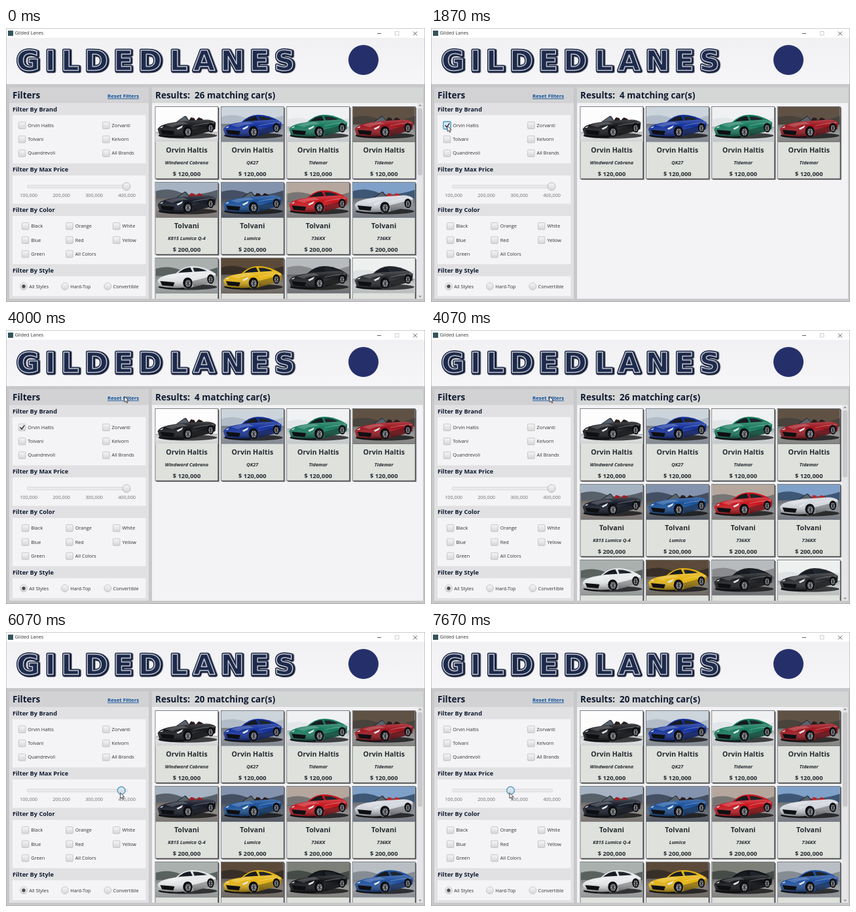
Recreate the animation shown at these times as an HTML page. Size 640 px wide and 420 px high, loop 8 s.

```html
<!DOCTYPE html>
<html lang="en">
<head>
<meta charset="utf-8">
<title>Gilded Lanes</title>
<style>
  html, body { margin: 0; width: 100%; height: 100%; overflow: hidden; background: #c8c8ca; }
  svg { display: block; }
  #stage { width: 100vw; height: 100vh; }
  text { font: 7.3px "Open Sans", "Noto Sans", sans-serif; fill: #333; white-space: pre; }
  .h1 { font-size: 13.5px; font-weight: 700; fill: #0f1a30; }
  .h2 { font-size: 9.2px; font-weight: 700; fill: #0f1a30; }
  .link { font-size: 7.8px; font-weight: 700; fill: #0b4f9c; text-decoration: underline; }
  .tick { fill: #707070; text-anchor: middle; }
  .brand, .model, .price { text-anchor: middle; font-weight: 700; fill: #262b30; }
  .brand { font-size: 10.7px; }
  .model { font-size: 7.4px; font-style: italic; }
  .price { font-size: 9.4px; }
  .logo { font: 700 43px "DejaVu Sans", sans-serif; letter-spacing: 8.5px; stroke-linejoin: round; }
</style>
</head>
<body>
<svg id="stage" viewBox="0 0 640 420">
  <defs>
    <linearGradient id="knob" x2="0" y2="1">
      <stop stop-color="#f6f6f6"/><stop offset="1" stop-color="#d6d6d6"/>
    </linearGradient>
    <linearGradient id="head" x2="0" y2="1">
      <stop stop-color="#f1f0f3"/><stop offset="1" stop-color="#f6f5f8"/>
    </linearGradient>
    <linearGradient id="gloss" x2="0" y2="1">
      <stop stop-color="#fff" stop-opacity=".2"/><stop offset=".35" stop-color="#fff" stop-opacity="0"/>
      <stop offset="1" stop-color="#000" stop-opacity=".5"/>
    </linearGradient>
    <linearGradient id="floor" x2="0" y2="1">
      <stop stop-color="#000" stop-opacity=".18"/><stop offset=".5" stop-color="#fff" stop-opacity=".1"/>
      <stop offset="1" stop-color="#000" stop-opacity=".08"/>
    </linearGradient>
  </defs>
</svg>
<script>
const LOOP = 8000;
const stage = document.getElementById('stage');

const rect = (x, y, w, h, fill, extra = '') =>
  `<rect x="${x}" y="${y}" width="${w}" height="${h}" fill="${fill}" ${extra}/>`;
const label = (x, y, text, cls = '', extra = '') =>
  `<text x="${x}" y="${y}" class="${cls}" ${extra}>${text}</text>`;
const path = (d, fill, extra = '') => `<path d="${d}" fill="${fill}" ${extra}/>`;
const circle = (x, y, r, fill, extra = '') => `<circle cx="${x}" cy="${y}" r="${r}" fill="${fill}" ${extra}/>`;
const ellipse = (x, y, rx, ry, fill, extra = '') =>
  `<ellipse cx="${x}" cy="${y}" rx="${rx}" ry="${ry}" fill="${fill}" ${extra}/>`;
const group = (id, content) => `<g id="${id}">${content}</g>`;

function titleBar() {
  return rect(0, 0, 640, 15, '#fff') + rect(3, 4, 8, 8, '#35545c') + label(13.5, 10.4, 'Gilded Lanes') +
    path('M567 8.5h6M622 5.5l6 6m0-6l-6 6', 'none', 'stroke="#333" stroke-width=".8"') +
    rect(594.5, 5.5, 5.5, 5.5, 'none', 'stroke="#c4c4c4" stroke-width=".8"');
}

function banner() {
  const words = (shift, fill, stroke, width) => {
    const style = `style="fill:${fill};stroke:${stroke};stroke-width:${width}"`;
    return label(16 + shift, 65 + shift, 'GILDED', 'logo', style) +
      label(250 + shift, 65 + shift, 'LANES', 'logo', style);
  };
  return rect(0, 15, 640, 71, 'url(#head)') +
    words(1.4, '#141d36', '#9b9da6', 6.6) + words(1.2, '#141d36', '#141d36', 5) +
    words(0, '#1d2a4c', '#1d2a4c', 4.4) + words(0, '#1d2a4c', '#c4c6cc', 1.5) +
    circle(546, 49, 23, '#25306b');
}

const checkBox = (x, y, text) =>
  rect(x, y - 5, 10.5, 10.5, 'url(#knob)', 'rx="1" stroke="#bcbcbc" stroke-width=".8"') +
  label(x + 14, y + 2.6, text);

const radio = (x, text, selected) =>
  circle(x, 396, 5.4, 'url(#knob)', 'stroke="#bcbcbc" stroke-width=".8"') +
  (selected ? circle(x, 396, 2.7, '#4c4c4c') : '') + label(x + 8.3, 398.6, text);

const checkGrid = (xs, y, rows) => rows.map((row, r) =>
  row.map((text, c) => checkBox(xs[c], y + r * 21.4, text)).join('')).join('');

function filterPanel() {
  const box = (title, y, h) => label(10, y - 6, title, 'h2') + rect(10, y, 203.5, h, '#f4f3f6');
  return rect(5, 91, 213, 324, '#e1e1e3') + rect(5, 91, 213, 24, '#d2d2d4') +
    label(10, 107.8, 'Filters', 'h1') + label(155, 107, 'Reset Filters', 'link') +
    box('Filter By Brand', 133.5, 74) + box('Filter By Max Price', 226, 43.5) +
    box('Filter By Color', 288, 74) + box('Filter By Style', 380.5, 30.5) +
    checkGrid([19.3, 147.6], 149, [['Orvin Haltis', 'Zorvanti'], ['Tolvani', 'Kelvorn'], ['Quandrevoli', 'All Brands']]) +
    checkGrid([24.3, 91.7, 163.5], 303.5, [['Black', 'Orange', 'White'], ['Blue', 'Red', 'Yellow'], ['Green', 'All Colors']]) +
    radio(27, 'All Styles', true) + radio(90, 'Hard-Top') + radio(155.3, 'Convertible') +
    rect(32.5, 241, 153, 4, '#ececec', 'rx="1.5" stroke="#cfcfcf" stroke-width=".8"') +
    ['100,000', '200,000', '300,000', '400,000'].map((p, i) => label(34.6 + 50 * i, 258.7, p, 'tick')).join('') +
    group('ring', rect(18.8, 143.5, 11.5, 11.5, '#cfe9f8', 'rx="1.5" fill-opacity=".6" stroke="#3d9ccc" stroke-width="1.3"')) +
    group('check', path('M21.5 149l2.6 3 4.2-6', 'none', 'stroke="#333" stroke-width="1.4"')) +
    group('thumb', circle(0, 243, 6, 'url(#knob)', 'stroke="#b4b4b4" stroke-width=".9"') +
      group('thumbRing', circle(0, 243, 5.8, '#bcd9ec', 'fill-opacity=".4" stroke="#4a9ccb" stroke-width="1.3"')));
}

// Three-quarter view of a low sports car in front of a simple backdrop.
function photo(x, y, { sky, far, ground, paint, open, horizon, seat = '#2a1c1c' }) {
  const wheel = (cx, cy, rx, ry) => ellipse(cx, cy, rx, ry, '#101114') +
    ellipse(cx - .4, cy, rx * .68, ry * .72, '#8b8e94') +
    path(`M${cx - .4} ${cy - ry * .7}v${ry * 1.4}M${cx - rx * .6} ${cy - ry * .4}l${rx} ${ry * .8}m0 ${-ry * .8}l${-rx} ${ry * .8}`,
      'none', 'stroke="#1b1c20" stroke-width=".9"');
  const body = 'M3 34Q6 28 20 25L38 22L70 20Q86 18 92 24L91 34L84 37L58 44Q46 47 20 46L6 43Z';
  const cabin = open
    ? path('M32 23L45 14L47 14L52 22Z', '#59636d') + path('M32 23L45 14L52 22', 'none', 'stroke="#15171b" stroke-width=".9"') +
      path('M50 22L54 16L59 17L61 21L66 16L71 18L74 21Z', seat)
    : path('M30 24Q42 12 56 12Q72 12 88 21L60 26Z', paint) + path('M33 24Q43 14 53 14L58 24Z', '#171b21') +
      path('M60 23L57 14.500Q70 14 79 20Z'.replace('14.500', '14.5'), '#1f252c');
  return `<svg x="${x}" y="${y}" width="95" height="53.5">` +
    rect(0, 0, 95, 54, sky) +
    path(`M0 ${horizon - 11}Q18 ${horizon - 17} 38 ${horizon - 9}T95 ${horizon - 13}V54H0Z`, far) +
    rect(0, horizon, 95, 54 - horizon, ground) + rect(0, horizon, 95, 54 - horizon, 'url(#floor)') +
    ellipse(49, 44, 45, 4.5, '#0c0c0e', 'opacity=".75"') +
    cabin + path(body, paint) + path(body, 'url(#gloss)') +
    path('M56 35L91 26V34L84 37L58 44Z', '#000', 'opacity=".3"') +
    path('M14 28Q26 24 42 23L50 26Q34 27 26 31Z', '#fff', 'opacity=".22"') +
    path('M57 29Q72 25 90 24', 'none', 'stroke="#fff" stroke-opacity=".4" stroke-width=".8"') +
    path('M7 35L29 37L27 43L10 41.5Z', '#0e0f12') + path('M5 43Q24 47 44 45V47Q20 48 6 45Z', '#0e0f12') +
    path('M32 33L42 28L40 32L34 35Z', '#dfe5e8') + path('M6 32L12 29L10 32Z', '#dfe5e8') +
    ellipse(49, 37.5, 7.2, 8, '#0a0b0d') + wheel(50, 38.5, 6, 7.8) +
    ellipse(84, 31.5, 5.2, 7, '#0a0b0d') + wheel(84.5, 32.5, 4.4, 6.6) + '</svg>';
}

const scene = (sky, far, ground, paint, open, horizon, seat) => ({ sky, far, ground, paint, open, horizon, seat });
const topRows = [
  scene('#fdfdfd', '#fafafa', '#dfe0e1', '#17181c', true, 38),
  scene('#ccd4dc', '#b2bcc8', '#8d939c', '#12309c', false, 26),
  scene('#eff1f2', '#e3e6e8', '#d2d6d8', '#167a5c', false, 30),
  scene('#5f5245', '#48433c', '#8c8d8c', '#9e141d', true, 27),
  scene('#a6b3c3', '#58606a', '#857f7c', '#151a28', true, 24, '#a11f22'),
  scene('#8493ad', '#444f63', '#5b606a', '#18509a', true, 25),
  scene('#b5a79e', '#777574', '#858587', '#c8151d', false, 28),
  scene('#7fa0c8', '#3e5775', '#80848b', '#d3d7de', true, 24, '#b92a2c')
];
const bottomLeft = [
  scene('#a9b0ae', '#59625f', '#a0a3a4', '#e6e8ea', false, 27),
  scene('#5b4a39', '#372f27', '#77706a', '#e5b412', false, 25)
];
const bottomAll = [
  scene('#b8bbbe', '#8a8b8e', '#77787b', '#1b1c20', false, 25),
  scene('#eef0f0', '#dfe2e2', '#c7caca', '#27292d', false, 31)
];
const bottomCheaper = [
  scene('#7d8079', '#454c47', '#8b8a87', '#101216', false, 26),
  scene('#b9bec4', '#858c94', '#94989d', '#20509e', false, 27)
];
const models = ['Windward Cabrena', 'QK27', 'Tidemar', 'Tidemar', 'K815 Lumica Q-4', 'Lumica', '736KX', '736KX'];

function card(car, index) {
  const x = 228 + index % 4 * 100.4, row = Math.floor(index / 4), y = 120.5 + row * 116, mid = x + 48;
  let out = rect(x + 1.5, y + 1.5, 96.5, 111, '#222', 'rx="1" opacity=".45"') +
    rect(x + .8, y + .8, 96, 110.7, '#333', 'rx="1"') +
    rect(x, y, 95.8, 110.5, '#dee1dc', 'stroke="#62666a" stroke-width=".8"') + photo(x + .5, y + .5, car);
  if (row < 2) {
    out += label(mid, y + 70.5, ['Orvin Haltis', 'Tolvani'][row], 'brand') +
      label(mid, y + 88, models[index], 'model') +
      label(mid, y + 106.3, ['$ 120,000', '$ 200,000'][row], 'price');
  }
  return out;
}

function resultsPanel() {
  const cards = (cars, first) => cars.map((car, i) => card(car, first + i)).join('');
  return rect(223, 91, 414, 324, '#f3f2f5') + rect(223, 91, 414, 24, '#d5d6d6') +
    label(228, 107.8, '', 'h1', 'id="count"') +
    cards(topRows.slice(0, 4), 0) +
    group('more', cards(topRows.slice(4), 4) + cards(bottomLeft, 8) +
      group('allCars', cards(bottomAll, 10)) + group('cheaperCars', cards(bottomCheaper, 10)) +
      rect(628, 115, 9, 300, '#e6e6e8') +
      rect(629, 123, 7, 103, '#c9c9cb', 'id="scroll" rx="3"') +
      path('M630 119.5l2.5-2.5 2.5 2.5zM630 410.5l2.5 2.5 2.5-2.5z', '#8a8a8a'));
}

stage.insertAdjacentHTML('beforeend',
  rect(0, 0, 640, 420, '#c8c8ca') + titleBar() + banner() + filterPanel() + resultsPanel() +
  rect(0, 415, 640, 5, '#c8c8ca') + rect(637, 86, 3, 334, '#c8c8ca') +
  rect(.25, .25, 639.5, 419.5, 'none', 'stroke="#9a9a9a" stroke-width=".5"') +
  group('cursor', path('M0 0V8.5L2 6.7 3.5 10 4.9 9.4 3.5 6.2H6.2Z', '#fff', 'stroke="#222" stroke-width=".8"')));

const parts = Object.fromEntries([...stage.querySelectorAll('g[id], text[id], rect[id]')].map(el => [el.id, el]));

// Keys: time in ms, then position.
const thumbPath = [[5830, 184], [6600, 159], [6730, 153.5], [7470, 133], [7670, 121.5]];
const cursorPath = [
  [530, 86, 134], [700, 60, 160], [880, 36, 163], [1070, 27, 150], [1400, 27, 150], [1470, 25, 150],
  [3200, 25, 150], [3270, 198, 125], [3670, 182, 106], [3870, 182, 106], [3940, 181, 102],
  [4530, 181, 102], [4670, 157, 209], [4870, 157, 211], [5000, 174, 247], [5200, 162, 282],
  [5400, 148, 270], [5670, 177, 246], [5800, 182.5, 246.5]
];

function along(keys, t) {
  const next = keys.findIndex(key => key[0] > t);
  if (next < 0) return keys[keys.length - 1].slice(1);
  if (next === 0) return keys[0].slice(1);
  const a = keys[next - 1], b = keys[next], k = (t - a[0]) / (b[0] - a[0]);
  return a.slice(1).map((v, i) => v + (b[i + 1] - v) * k);
}

const show = (part, on) => part.setAttribute('display', on ? 'inline' : 'none');

function render(t) {
  const between = (from, to) => t >= from && t < to;
  const byBrand = between(1865, 4070), byPrice = t >= 5930, dragging = t >= 5800;
  const [thumbX] = along(thumbPath, t);
  const [x, y] = dragging ? [thumbX - 1.5, 246.5] : along(cursorPath, t);

  parts.count.textContent = `Results:  ${byBrand ? 4 : byPrice ? 20 : 26} matching car(s)`;
  show(parts.more, !byBrand);
  show(parts.allCars, !byPrice);
  show(parts.cheaperCars, byPrice);
  parts.scroll.setAttribute('height', byPrice ? 145 : 103);
  show(parts.check, byBrand);
  show(parts.ring, between(1795, 3940));
  show(parts.thumbRing, dragging);
  parts.thumb.setAttribute('transform', `translate(${thumbX})`);
  show(parts.cursor, between(530, 3065) || t >= 3270);
  parts.cursor.setAttribute('transform', `translate(${x} ${y})`);
}

const start = performance.now();
function tick() {
  render((performance.now() - start) % LOOP);
  requestAnimationFrame(tick);
}
tick();
</script>
</body>
</html>
```
